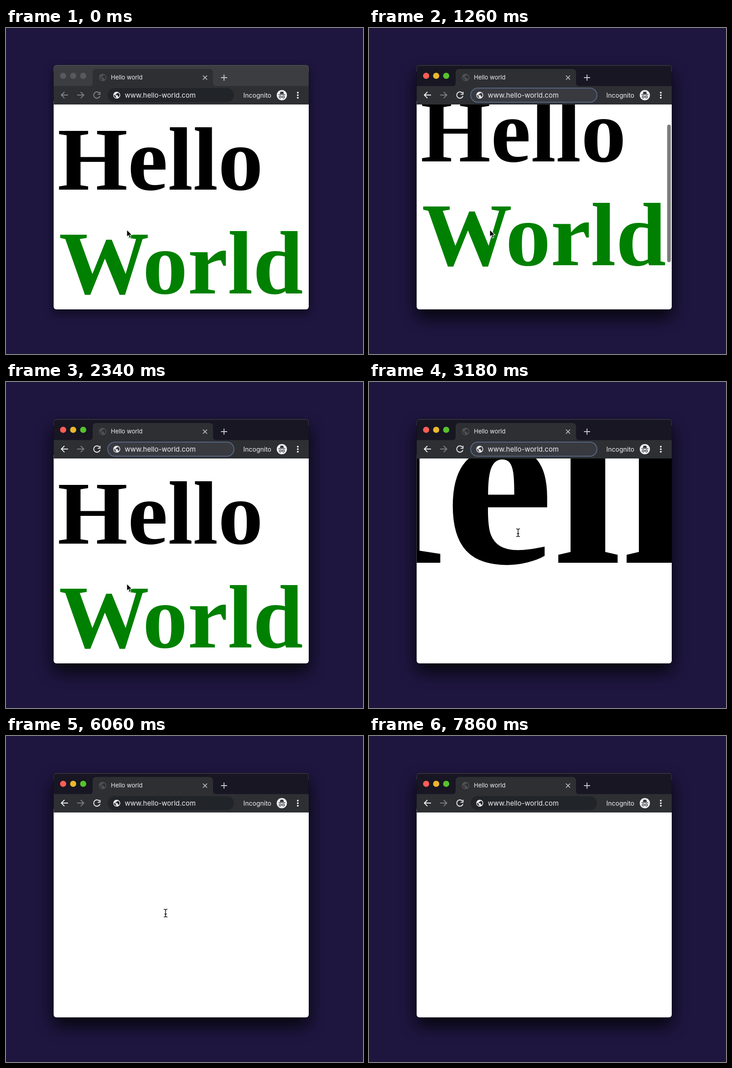
Write an HTML page that moves like this. It is 783 by 716 pixels and loops after 7.98 s.

```html
<!DOCTYPE html>
<html lang="en">
<head>
<meta charset="utf-8">
<title>Hello world</title>
<style>
  html, body { margin: 0; width: 100%; height: 100%; overflow: hidden; background: #1e163f; }
  svg { display: block; }
  .page { font: bold 198px "Liberation Serif", "Times New Roman", serif; }
  .ui { font-family: Inter, Roboto, sans-serif; fill: #f1f1f3; }
</style>
</head>
<body>
<svg width="783" height="716" viewBox="0 0 783 716">
  <defs>
    <clipPath id="frame"><rect x="104.5" y="81.5" width="559.5" height="536.5" rx="6"/></clipPath>
    <filter id="soft" x="-30%" y="-30%" width="160%" height="160%"><feGaussianBlur stdDeviation="10"/></filter>
    <filter id="wide" x="-30%" y="-30%" width="160%" height="160%"><feGaussianBlur stdDeviation="18"/></filter>
    <path id="globe" d="M12 2C6.48 2 2 6.48 2 12s4.48 10 10 10 10-4.48 10-10S17.52 2 12 2zm-1 17.93c-3.95-.49-7-3.85-7-7.93 0-.62.08-1.21.21-1.79L9 15v1c0 1.1.9 2 2 2v1.93zm6.9-2.54c-.26-.81-1-1.39-1.9-1.39h-1v-3c0-.55-.45-1-1-1H8v-2h2c.55 0 1-.45 1-1V7h2c1.1 0 2-.9 2-2v-.41c2.93 1.19 5 4.06 5 7.41 0 2.08-.8 3.97-2.1 5.39z"/>
    <path id="back" d="M8 0H-6.5M.2-6.8L-6.7 0L.2 6.8" fill="none" stroke-width="1.9"/>
  </defs>

  <rect width="783" height="716" fill="#1e163f"/>
  <rect id="shadeIdle" x="104" y="90" width="560" height="536" rx="8" opacity=".55" filter="url(#soft)"/>
  <rect id="shadeActive" x="104" y="100" width="560" height="536" rx="8" opacity=".8" filter="url(#wide)"/>
  <rect x="104" y="81" width="560.5" height="537.5" rx="6.5" fill="#0c0a18"/>

  <g clip-path="url(#frame)">
    <rect x="104" y="160" width="560" height="460" fill="#fff"/>
    <g id="page" class="page">
      <text x="113" y="355">Hello</text>
      <text y="583" fill="#008000"><tspan x="116">W</tspan><tspan x="299.5">orld</tspan></text>
    </g>
    <rect id="thumb" x="654" width="8" height="302" rx="4" fill="#7d7d7d"/>

    <rect id="strip" x="104" y="81" width="560" height="47"/>
    <path d="M182 128q8 0 8-8V98q0-8 8-8H446q8 0 8 8V120q0 8 8 8z" fill="#2d2f33"/>
    <rect x="104" y="127.5" width="560" height="40.5" fill="#2d2f33"/>
    <path d="M104.5 96V88q0-6 6-6H658q6 0 6 6V96" fill="none" stroke="#85868c" stroke-opacity=".7"/>

    <g id="lights">
      <circle cx="125.3" cy="105" r="6.8"/>
      <circle cx="147.3" cy="105" r="6.8"/>
      <circle cx="169.3" cy="105" r="6.8"/>
    </g>
    <use href="#globe" transform="translate(202.4 99.2) scale(.8)" fill="#505257"/>
    <text id="title" class="ui" x="230" y="113.3" font-size="13">Hello world</text>
    <path d="M432 104.5l9 9m0-9l-9 9" stroke="#c4c6ca" stroke-width="1.7"/>
    <path d="M471.5 109h13.5M478.2 102.2v13.5" stroke="#c8cace" stroke-width="1.9"/>

    <g id="nav">
      <use href="#back" transform="translate(128 147.3)"/>
      <path d="M204.8 142.8A7 7 0 1 0 206.1 149.3M206.3 140.3V145.6H201" fill="none" stroke-width="1.9"/>
    </g>
    <use href="#back" transform="translate(164 147.3) scale(-1 1)" stroke="#7d7f83"/>

    <rect id="pill" x="223" y="132" width="277" height="31" rx="15.5" stroke-width="2"/>
    <use href="#globe" transform="translate(233.8 138.4) scale(.76)" fill="#eceef0"/>
    <text class="ui" x="260.5" y="153" font-size="15">www.hello-world.com</text>
    <text class="ui" x="520.5" y="152.8" font-size="14">Incognito</text>
    <circle cx="605" cy="147.5" r="11.2" fill="#eff0f2"/>
    <g fill="#303236">
      <path d="M600.4 145l1.5-4.6q.4-1 1.4-.6l1.7.5 1.7-.5q1-.4 1.4.6l1.5 4.6z"/>
      <rect x="597.5" y="145.8" width="15" height="1.4"/>
      <path d="M603.5 151.2q1.5-.8 3 0" fill="none" stroke="#303236"/>
      <circle cx="601.4" cy="151.6" r="2.2" fill="none" stroke="#303236" stroke-width="1.2"/>
      <circle cx="608.6" cy="151.6" r="2.2" fill="none" stroke="#303236" stroke-width="1.2"/>
    </g>
    <g fill="#f1f1f3">
      <circle cx="640" cy="142" r="1.9"/>
      <circle cx="640" cy="147.6" r="1.9"/>
      <circle cx="640" cy="153.2" r="1.9"/>
    </g>
  </g>

  <path id="arrow" d="M0 0V15.8L3.6 12.5L6.1 18.2L8.9 17L6.4 11.5H11.4z" stroke="#fff" stroke-width="1.1"/>
  <g id="beam" fill="none" stroke-linecap="round">
    <path id="beamShape" d="M-3.5-8.5Q-.3-8.5 0-6.5Q.3-8.5 3.5-8.5M0-6.5V6.5M-3.5 8.5Q-.3 8.5 0 6.5Q.3 8.5 3.5 8.5M-2 2H2" stroke="#fff" stroke-width="3.2"/>
    <use href="#beamShape" id="beamInk"/>
    <path d="M-3.5-8.5Q-.3-8.5 0-6.5Q.3-8.5 3.5-8.5M0-6.5V6.5M-3.5 8.5Q-.3 8.5 0 6.5Q.3 8.5 3.5 8.5M-2 2H2" stroke="#000" stroke-width="1.4"/>
  </g>
</svg>
<script>
const LOOP = 7980, STEP = 60;
const $ = id => document.getElementById(id);
const set = (id, attrs) => {
  for (const name in attrs) $(id).setAttribute(name, attrs[name]);
};
const smooth = p => p * p * (3 - 2 * p);

// Eased value through [time, value] points.
function track(t, points) {
  if (t <= points[0][0]) return points[0][1];
  for (let i = 1; i < points.length; i++) {
    const [t0, v0] = points[i - 1], [t1, v1] = points[i];
    if (t <= t1) return v0 + (v1 - v0) * smooth((t - t0) / (t1 - t0));
  }
  return points[points.length - 1][1];
}

const scrollPath = [[240, 0], [1020, -90], [1860, 49.7], [2340, 0]];
const thumbFade = [[240, 0], [420, 1], [2040, 1], [2340, 0]];
const zoomPath = [[2820, 1], [3300, 3.043], [3780, 3.043], [4080, 1]];
const cursorTimes = [2520, 2820, 4080, 4500, 6420, 7140, 7260, 7860];
const cursorX = [265, 327, 327, 350, 350, 315, 315, 62];
const cursorY = [443, 331, 331, 389, 389, 455, 455, 740];
const along = (t, values) => track(t, cursorTimes.map((time, i) => [time, values[i]]));

const BLINK_START = 5140, BLINK = 453;
const lightColors = ["#fe5d55", "#eab82d", "#57c22c"];

function draw(t) {
  const active = t >= 60;
  const urlFocus = active && t < 4860;
  const scroll = track(t, scrollPath);
  const zoom = track(t, zoomPath);
  const hidden = t >= BLINK_START && Math.floor((t - BLINK_START) / BLINK) % 2 === 0;

  set("page", {
    transform: `translate(326 ${330.7 + scroll}) scale(${zoom}) translate(-326 -330.7)`,
    visibility: hidden ? "hidden" : "visible"
  });
  set("thumb", { y: 170 + Math.max(0, -scroll) * .68, opacity: track(t, thumbFade) });

  set("shadeIdle", { visibility: active ? "hidden" : "visible" });
  set("shadeActive", { visibility: active ? "visible" : "hidden" });
  set("strip", { fill: active ? "#171622" : "#3c3d41" });
  set("title", { fill: active ? "#f1f1f3" : "#cbccd0" });
  set("nav", { stroke: active ? "#f1f1f3" : "#85878b" });
  set("pill", {
    fill: urlFocus ? "#383a40" : "#212429",
    stroke: urlFocus ? "#56647f" : "none"
  });
  [...$("lights").children].forEach((dot, i) =>
    dot.setAttribute("fill", active ? lightColors[i] : "#58595c"));

  const isBeam = t >= 2640 && t < 7620;
  const place = `translate(${along(t, cursorX)} ${along(t, cursorY)})`;
  set("arrow", { transform: place, visibility: isBeam ? "hidden" : "visible" });
  set("beam", { transform: place, visibility: isBeam ? "visible" : "hidden" });
}

const start = performance.now();
function tick() {
  const t = (performance.now() - start) % LOOP;
  draw(Math.floor(t / STEP) * STEP);
  requestAnimationFrame(tick);
}
tick();
</script>
</body>
</html>
```
